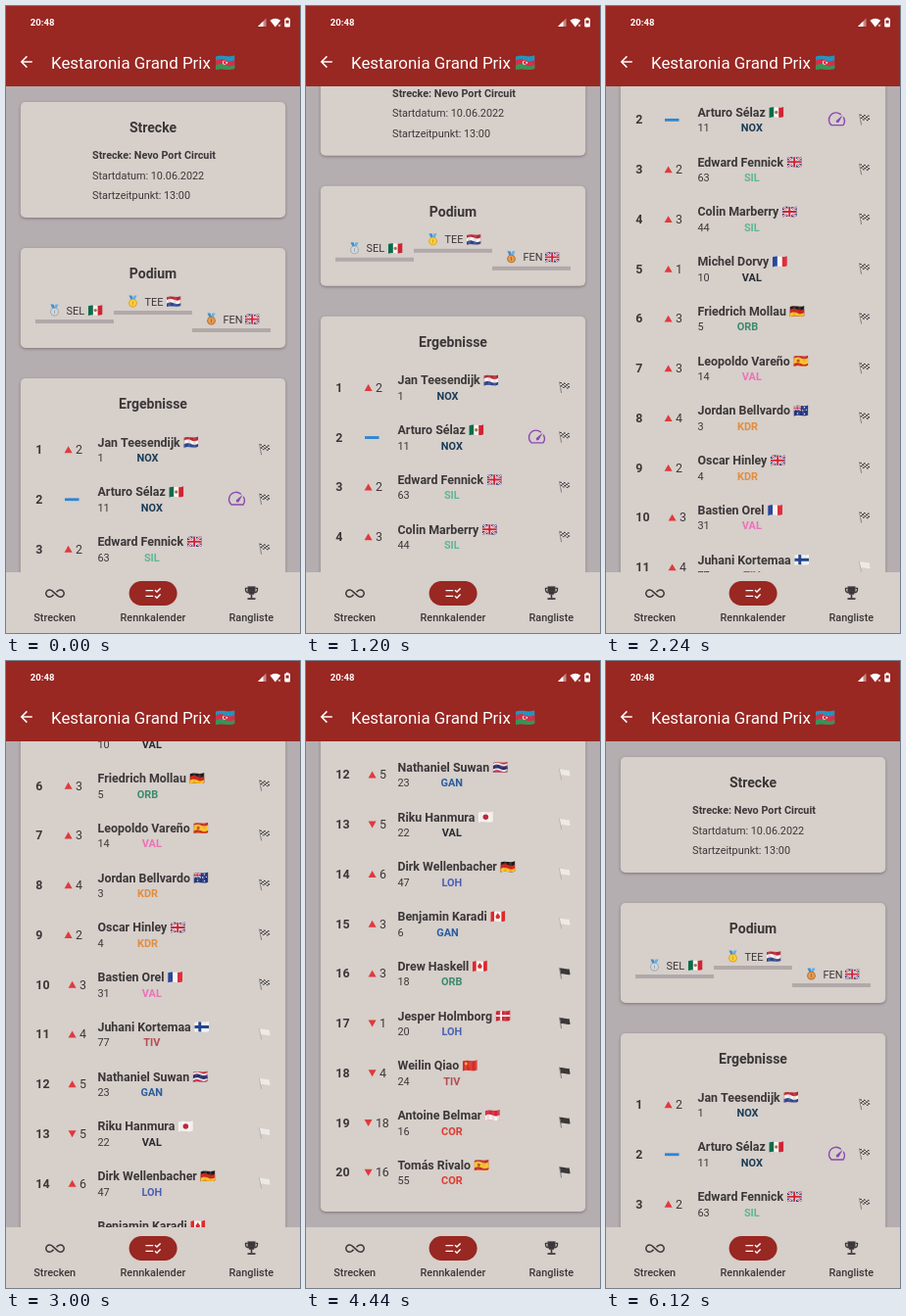
Recreate the animation shown at these times as an HTML page with a canvas. Size 300 by 640 pixels, loop 6720 ms.

```html
<!DOCTYPE html>
<html lang="de">
<head>
<meta charset="utf-8">
<title>Rennkalender</title>
<style>
html, body { margin: 0; width: 100%; height: 100%; overflow: hidden; background: #b4aeb0; }
canvas { display: block; width: 300px; height: 640px; }
</style>
</head>
<body>
<canvas id="stage"></canvas>
<script>
const W = 300, H = 640, LOOP = 6720;
const HEADER = 82, NAV = 578, ROW = 50.75;
const RED = '#992722', CARD = '#d6cfca', PAGE = '#b4aeb0', INK = '#3b3739';

const canvas = document.getElementById('stage');
const ctx = canvas.getContext('2d');
const ratio = window.devicePixelRatio || 1;
canvas.width = W * ratio;
canvas.height = H * ratio;

// time in ms, scroll offset in px
const SCROLL = [
  [900, 0], [1200, 63], [1520, 135], [1840, 170], [2040, 285], [2240, 387],
  [2600, 515], [3000, 579], [3300, 735], [3720, 895],
  [4480, 895], [4640, 765], [4840, 310], [5040, 0]
];

const TEAM = {
  NOX: '#1c3b56', SIL: '#5fb697', VAL: '#272a30', VEL: '#ee6fba', ORB: '#3c8a6e',
  KDR: '#e28d3d', TIV: '#b24c52', GAN: '#295c9f', LOH: '#4a61b3', COR: '#dd3a32'
};

// name, flag, places gained, number, team
const RESULTS = [
  ['Jan Teesendijk', 'nl', 2, 1, 'NOX'],
  ['Arturo Sélaz', 'mx', 0, 11, 'NOX'],
  ['Edward Fennick', 'gb', 2, 63, 'SIL'],
  ['Colin Marberry', 'gb', 3, 44, 'SIL'],
  ['Michel Dorvy', 'fr', 1, 10, 'VAL'],
  ['Friedrich Mollau', 'de', 3, 5, 'ORB'],
  ['Leopoldo Vareño', 'es', 3, 14, 'VEL'],
  ['Jordan Bellvardo', 'au', 4, 3, 'KDR'],
  ['Oscar Hinley', 'gb', 2, 4, 'KDR'],
  ['Bastien Orel', 'fr', 3, 31, 'VEL'],
  ['Juhani Kortemaa', 'fi', 4, 77, 'TIV'],
  ['Nathaniel Suwan', 'th', 5, 23, 'GAN'],
  ['Riku Hanmura', 'jp', -5, 22, 'VAL'],
  ['Dirk Wellenbacher', 'de', 6, 47, 'LOH'],
  ['Benjamin Karadi', 'ca', 3, 6, 'GAN'],
  ['Drew Haskell', 'ca', 3, 18, 'ORB'],
  ['Jesper Holmborg', 'dk', -1, 20, 'LOH'],
  ['Weilin Qiao', 'cn', -4, 24, 'TIV'],
  ['Antoine Belmar', 'mc', -18, 16, 'COR'],
  ['Tomás Rivalo', 'es', -16, 55, 'COR']
];

// stripe direction, then colours
const FLAGS = {
  nl: ['h', '#b52932', '#f6f4f2', '#27478f'],
  mx: ['v', '#0b6b4b', '#f6f4f2', '#cf2434'],
  fr: ['v', '#2b479c', '#f6f4f2', '#df2f3b'],
  de: ['h', '#1d1b1b', '#d82822', '#f6c928'],
  es: ['h', '#c62a2b', '#f7c531', '#f7c531', '#c62a2b'],
  th: ['h', '#c5283d', '#f6f4f2', '#2c2f6b', '#2c2f6b', '#f6f4f2', '#c5283d'],
  ca: ['v', '#dd2a2c', '#f6f4f2', '#f6f4f2', '#dd2a2c'],
  mc: ['h', '#d5273a', '#f6f4f2'],
  az: ['h', '#1f9ac6', '#dd2b45', '#2f9a55'],
  gb: ['h', '#27397c'],
  au: ['h', '#22357f'],
  fi: ['h', '#f6f4f2'],
  jp: ['h', '#f6f4f2'],
  dk: ['h', '#cb2737'],
  cn: ['h', '#dc2a24']
};

// monotone cubic through the scroll points
function scrollAt(t) {
  const p = SCROLL, last = p.length - 1;
  if (t <= p[0][0]) return p[0][1];
  if (t >= p[last][0]) return p[last][1];
  const slope = i => (p[i + 1][1] - p[i][1]) / (p[i + 1][0] - p[i][0]);
  const tangent = i => {
    if (i === 0 || i === last) return slope(i ? last - 1 : 0);
    const a = slope(i - 1), b = slope(i);
    return a * b <= 0 ? 0 : 2 * a * b / (a + b);
  };
  let i = 0;
  while (t >= p[i + 1][0]) i++;
  const d = p[i + 1][0] - p[i][0], u = (t - p[i][0]) / d, v = 1 - u;
  return (1 + 2 * u) * v * v * p[i][1] + u * v * v * d * tangent(i)
    + u * u * (3 - 2 * u) * p[i + 1][1] - u * u * v * d * tangent(i + 1);
}

function text(s, x, y, size, weight = 400, color = INK, align = 'left') {
  ctx.font = `${weight} ${size}px Roboto, sans-serif`;
  ctx.fillStyle = color;
  ctx.textAlign = align;
  ctx.fillText(s, x, y);
  return ctx.measureText(s).width;
}

function rect(x, y, w, h, color) {
  ctx.fillStyle = color;
  ctx.fillRect(x, y, w, h);
}

function dot(x, y, r, color) {
  ctx.fillStyle = color;
  ctx.beginPath();
  ctx.arc(x, y, r, 0, 7);
  ctx.fill();
}

function poly(color, ...pts) {
  ctx.fillStyle = color;
  ctx.beginPath();
  for (let i = 0; i < pts.length; i += 2) ctx.lineTo(pts[i], pts[i + 1]);
  ctx.fill();
}

function stroke(path, color, width) {
  ctx.strokeStyle = color;
  ctx.lineWidth = width;
  ctx.stroke(new Path2D(path));
}

function at(x, y, draw) {
  ctx.save();
  ctx.translate(x, y);
  draw();
  ctx.restore();
}

function wavePath(w, h, amp) {
  ctx.beginPath();
  ctx.moveTo(0, amp);
  ctx.bezierCurveTo(w * .35, -amp, w * .6, amp * 2, w, 0);
  ctx.lineTo(w, h - amp);
  ctx.bezierCurveTo(w * .6, h + amp, w * .35, h - amp * 2, 0, h);
  ctx.closePath();
}

function unionJack(w, h) {
  const diagonals = `M0 0L${w} ${h}M${w} 0L0 ${h}`;
  const cross = `M${w / 2} 0V${h}M0 ${h / 2}H${w}`;
  stroke(diagonals, '#f6f4f2', h * .2);
  stroke(diagonals, '#cf2434', h * .07);
  stroke(cross, '#f6f4f2', h * .32);
  stroke(cross, '#cf2434', h * .18);
}

function flagDetail(code, w, h) {
  const cx = w / 2, cy = h / 2;
  const nordic = `M${w * .37} 0V${h}M0 ${cy}H${w}`;
  if (code === 'mx') dot(cx, cy, h * .15, '#9b7a4c');
  if (code === 'jp') dot(cx, cy, h * .25, '#c0283a');
  if (code === 'es') dot(w * .32, cy, h * .13, '#b5542f');
  if (code === 'fi') stroke(nordic, '#21468f', h * .26);
  if (code === 'dk') stroke(nordic, '#f6f4f2', h * .16);
  if (code === 'gb') unionJack(w, h);
  if (code === 'au') {
    unionJack(w / 2, h / 2);
    [[.26, .76], [.75, .2], [.62, .48], [.87, .42], [.75, .8]]
      .forEach(([x, y]) => dot(x * w, y * h, h * .06, '#fff'));
  }
  if (code === 'ca') {
    poly('#dd2a2c', cx, h * .2, cx + 2.4, cy, cx + 1.4, h * .7, cx - 1.4, h * .7, cx - 2.4, cy);
  }
  if (code === 'cn') {
    dot(w * .24, h * .33, h * .12, '#f0c23a');
    [.18, .36, .54].forEach(y => dot(w * .46, h * y, h * .04, '#f0c23a'));
  }
  if (code === 'az') {
    dot(cx - .6, cy, h * .14, '#fff');
    dot(cx, cy, h * .12, '#dd2b45');
    dot(cx + 1.7, cy, h * .06, '#fff');
  }
}

function flag(code, x, cy, w = 14.8, h = 11.2) {
  const [dir, ...colors] = FLAGS[code], n = colors.length, amp = h * .1;
  at(x, cy - h / 2, () => {
    wavePath(w, h, amp);
    ctx.clip();
    // stripes follow the wave of the cloth in thin columns
    const step = w / 12;
    colors.forEach((c, i) => {
      if (dir === 'v') return rect(w * i / n, -1, w / n + .3, h + 2, c);
      for (let k = 0; k < 12; k++) {
        const lift = i ? -amp * .8 * Math.sin(k / 11 * 2 * Math.PI) : -amp;
        rect(k * step, h * i / n + lift, step + .2, h - h * i / n + 2 * amp, c);
      }
    });
    flagDetail(code, w, h);
  });
}

function card(y, h, title) {
  ctx.save();
  ctx.shadowColor = 'rgba(40,30,30,.4)';
  ctx.shadowBlur = 3 * ratio;
  ctx.shadowOffsetY = ratio;
  ctx.fillStyle = CARD;
  ctx.beginPath();
  ctx.roundRect(14.8, y, 270.4, h, 5);
  ctx.fill();
  ctx.restore();
  text(title, W / 2, y + 30.8, 14, 700, INK, 'center');
}

function medal(x, y, color, rim) {
  poly('#3f8fd0', x - 4, y - 6, x - 1, y - 6, x + 1.4, y, x - 1.4, y);
  poly('#63b1e6', x + 4, y - 6, x + 1, y - 6, x - 1.4, y, x + 1.4, y);
  dot(x, y + 1.8, 4.3, rim);
  dot(x, y + 1.8, 3.4, color);
  rect(x - .5, y, 1, 3.6, rim);
}

function podium(x, y, code, country, color, rim) {
  rect(x, y, 80, 4, '#b1a9a9');
  medal(x + 19.5, y - 9.6, color, rim);
  text(code, x + 31.5, y - 5.4, 10.9);
  flag(country, x + 54, y - 9.4, 14.4, 10.8);
}

function raceFlag(x, y, kind) {
  at(x, y, () => {
    stroke('M.6 -5.4L2.6 6', kind === 'white' ? '#b0a9a5' : '#6d6766', .8);
    ctx.translate(.8, -5.4);
    ctx.transform(1, .12, .17, 1, 0, 0);
    wavePath(9.8, 6.6, .8);
    ctx.clip();
    rect(0, -2, 12, 11, kind === 'black' ? '#3a3838' : '#ece9e6');
    if (kind !== 'check') return;
    for (let i = 0; i < 20; i++) {
      const col = i % 5, row = i / 5 | 0;
      if ((col + row) % 2 === 0) rect(col * 1.96, row * 1.65, 1.96, 1.65, '#3f3c3c');
    }
  });
}

function gauge(x, y) {
  at(x, y, () => {
    ctx.lineCap = ctx.lineJoin = 'round';
    stroke('M3.4 -5.6A7.2 7.2 0 0 0 -6 5.4H6A7.2 7.2 0 0 0 6.4 -2.4', '#8a48b0', 1.4);
    poly('#8a48b0', 5.6, -5, 1.5, 2.6, -.6, 3, -1.3, .9);
  });
}

function resultRow([name, country, gain, number, team], i) {
  const y = 452.5 + ROW * i;
  text(i + 1, 30.3, y + 4.5, 12.4, 700);
  if (gain) {
    const places = Math.abs(gain), dir = Math.sign(gain);
    const x = 59.6 + (i > 8 ? 4 : 0) - (places > 9 ? 4 : 0);
    const base = y + .4 + 3.3 * dir, tip = y + .4 - 3.6 * dir;
    poly('#e0393d', x, base, x + 8, base, x + 4, tip);
    text(places, x + 11.3, y + 4.5, 12.4);
  } else {
    rect(60, y - .9, 14.5, 2.8, '#2a86d6');
    gauge(236, y + .4);
  }
  const w = text(name, 93.5, y - 3, 12.4, 700);
  flag(country, 93.5 + w + 3.6, y - 7.3);
  text(number, 93.5, y + 12.5, 10.9);
  const label = team === 'VEL' ? 'VAL' : team;
  text(label, number > 9 ? 148.8 : 144.5, y + 12.5, 10.9, 700, TEAM[team], 'center');
  raceFlag(258, y - .3, i < 10 ? 'check' : i < 15 ? 'white' : 'black');
}

function content(scroll) {
  at(0, -scroll, () => {
    card(98, 118, 'Strecke');
    text('Strecke: Nevo Port Circuit', 88, 156.4, 10.8, 700);
    text('Startdatum: 10.06.2022', 88, 176.6, 10.85);
    text('Startzeitpunkt: 13:00', 88, 197, 10.85);

    card(247, 102, 'Podium');
    podium(30, 320, 'SEL', 'mx', '#d3d8dc', '#9aa4ab');
    podium(110, 311, 'TEE', 'nl', '#f8cf3c', '#dca018');
    podium(190, 329, 'FEN', 'gb', '#e39a4d', '#b8692a');

    card(380, 1077, 'Ergebnisse');
    RESULTS.forEach((row, i) => {
      const y = 452.5 + ROW * i - scroll;
      if (y > 50 && y < 610) resultRow(row, i);
    });
  });
}

function statusIcons() {
  poly('rgba(255,255,255,.45)', 257, 21, 265.5, 21, 265.5, 12.5);
  poly('#fff', 257, 21, 262.5, 21, 262.5, 15.5);
  ctx.fillStyle = '#fff';
  ctx.beginPath();
  ctx.moveTo(274.8, 21.4);
  ctx.lineTo(269.4, 14.8);
  ctx.quadraticCurveTo(274.8, 10.6, 280.2, 14.8);
  ctx.fill();
  stroke('M277.8 18.6l2.4 2.4m0 -2.4l-2.4 2.4', '#fff', .7);
  ctx.fillStyle = '#fff';
  ctx.beginPath();
  ctx.roundRect(284.2, 12.8, 5.8, 8.6, .8);
  ctx.rect(285.8, 11.8, 2.6, 1.2);
  ctx.fill();
  rect(285.6, 14.6, 3, 3, RED);
}

function header() {
  rect(0, 0, W, HEADER, RED);
  text('20:48', 24.8, 20.4, 9.6, 700, '#fff');
  statusIcons();
  stroke('M26.8 57H16M21.4 51.4L15.8 57L21.4 62.6', '#fff', 1.5);
  text('Kestaronia Grand Prix', 46, 63.6, 16.9, 400, '#fff');
  flag('az', 213.8, 57.8, 19.6, 15);
}

function trophy(x, y) {
  at(x, y, () => {
    rect(-4, -7, 8, 5.5, INK);
    poly(INK, -4, -2, 4, -2, 2.4, 1.4, -2.4, 1.4);
    rect(-.8, 1, 1.6, 4, INK);
    rect(-4, 4.8, 8, 1.7, INK);
    stroke('M-4 -5H-6V-3.4Q-6 -1 -3.4 -.6M4 -5H6V-3.4Q6 -1 3.4 -.6', INK, 1.3);
  });
}

function nav() {
  rect(0, NAV, W, H - NAV, CARD);
  ctx.fillStyle = RED;
  ctx.beginPath();
  ctx.roundRect(125.6, 587, 49, 25, 12.5);
  ctx.fill();
  at(50, 599.6, () => stroke(
    'M-1.5 1.3L-2.8 2.5A3.7 3.7 0 1 1 -2.8 -2.5L2.8 2.5A3.7 3.7 0 1 0 2.8 -2.5L1.5 -1.3', INK, 1.5));
  at(150, 599.6, () => stroke(
    'M-7.5 -3H.2M-7.5 2.8H.2M2 -3.4L4 -1.5L7.6 -5.2M2 2.7L4 4.6L7.6 .9', '#fff', 1.4));
  trophy(250.5, 599.4);
  [['Strecken', 49.7], ['Rennkalender', 150], ['Rangliste', 250.3]]
    .forEach(([label, x]) => text(label, x, 627.8, 10.9, 500, INK, 'center'));
}

function frame(now) {
  ctx.setTransform(ratio, 0, 0, ratio, 0, 0);
  rect(0, 0, W, H, PAGE);
  content(scrollAt(now % LOOP));
  header();
  nav();
  requestAnimationFrame(frame);
}
requestAnimationFrame(frame);
</script>
</body>
</html>
```
